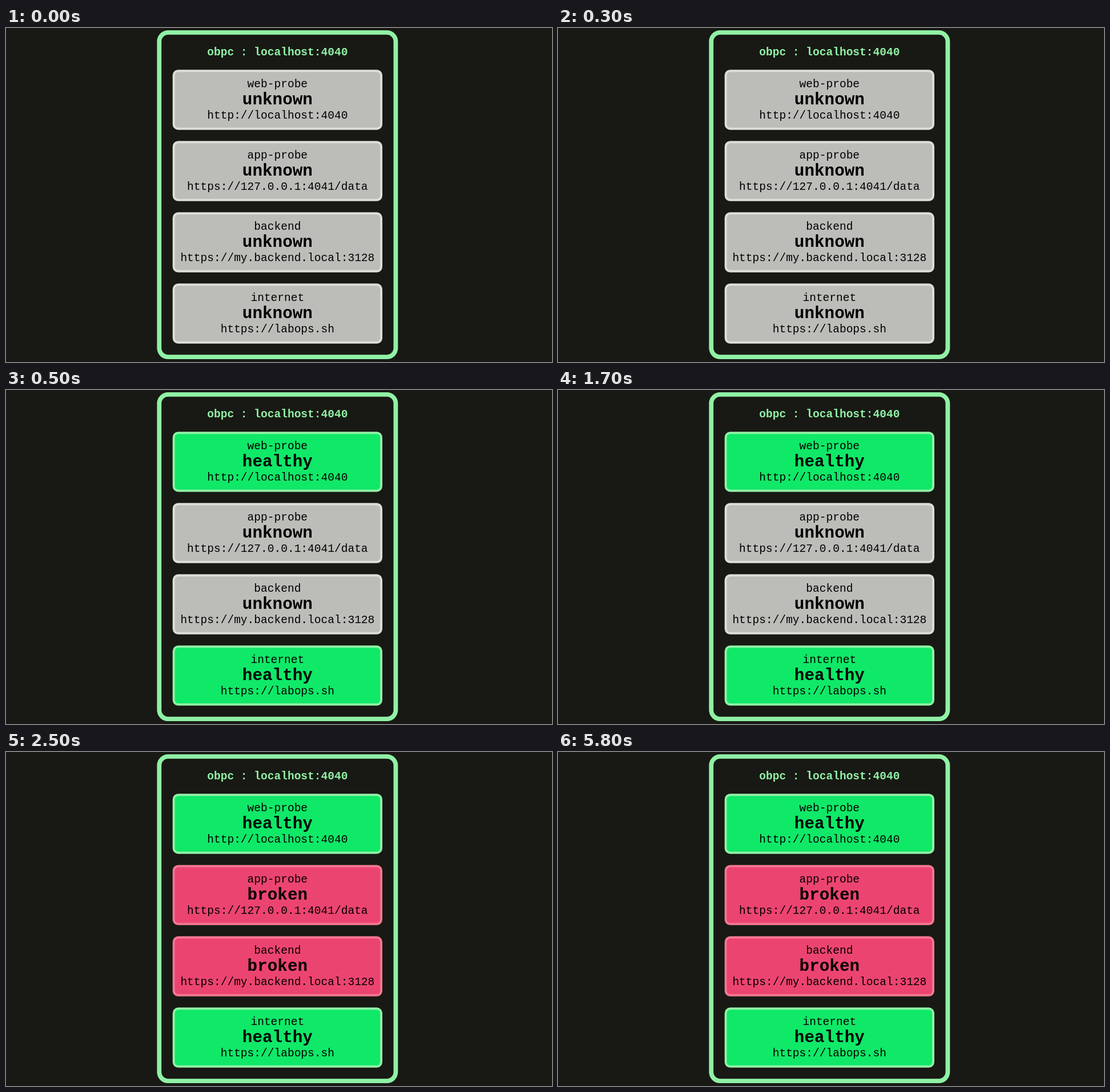
An HTML page with a canvas for the animation above (8000 ms loop, 956x586 px).

```html
<!DOCTYPE html>
<html lang="en">
<head>
<meta charset="utf-8">
<title>Probe status</title>
<style>
  html, body { margin: 0; width: 100%; height: 100%; overflow: hidden; background: #181914; }
  canvas { display: block; }
</style>
</head>
<body>
<canvas id="stage" width="956" height="586"></canvas>
<script>
const ctx = document.getElementById('stage').getContext('2d');
const LOOP = 8000;
const SCALE = 586 / 600;
const BG = '#181914';
const GREEN = '#90f1a5';
const PANEL = { x: 270.7, y: 4, w: 432, h: 591 };
const MID = PANEL.x + PANEL.w / 2;

const STATES = {
  unknown: { fill: '#bcbdb8', edge: '#deded9' },
  healthy: { fill: '#10e868', edge: GREEN },
  broken: { fill: '#ec4470', edge: '#f27891' }
};

const PROBES = [
  { name: 'web-probe', url: 'http://localhost:4040', at: 500, result: 'healthy' },
  { name: 'app-probe', url: 'https://127.0.0.1:4041/data', at: 2500, result: 'broken' },
  { name: 'backend', url: 'https://my.backend.local:3128', at: 2500, result: 'broken' },
  { name: 'internet', url: 'https://labops.sh', at: 500, result: 'healthy' }
];

function fillRound(x, y, w, h, r, color) {
  ctx.fillStyle = color;
  ctx.beginPath();
  ctx.roundRect(x, y, w, h, r);
  ctx.fill();
}

function box(x, y, w, h, r, border, edge, fill) {
  fillRound(x, y, w, h, r, edge);
  fillRound(x + border, y + border, w - 2 * border, h - 2 * border, r - border, fill);
}

function text(str, baseline, size, color, weight = 'normal') {
  ctx.font = `${weight} ${size}px "Liberation Mono", monospace`;
  ctx.fillStyle = color;
  ctx.fillText(str, MID, baseline);
}

function drawProbe(probe, i, t) {
  const state = t >= probe.at ? probe.result : 'unknown';
  const { fill, edge } = STATES[state];
  const y = PANEL.y + 71 + i * 128;
  box(PANEL.x + 28, y, PANEL.w - 56, 108, 10, 4, edge, fill);
  text(probe.name, y + 31, 20, '#000');
  text(state, y + 62, 30, '#000', 'bold');
  text(probe.url, y + 88, 20, '#000');
}

function draw(t) {
  ctx.setTransform(1, 0, 0, 1, 0, 0);
  ctx.fillStyle = BG;
  ctx.fillRect(0, 0, 956, 586);
  ctx.scale(SCALE, SCALE);
  ctx.textAlign = 'center';
  box(PANEL.x, PANEL.y, PANEL.w, PANEL.h, 20, 8, GREEN, BG);
  text('obpc : localhost:4040', PANEL.y + 45, 20, GREEN, 'bold');
  PROBES.forEach((probe, i) => drawProbe(probe, i, t));
}

const start = performance.now();
function tick() {
  draw((performance.now() - start) % LOOP);
  requestAnimationFrame(tick);
}
tick();
</script>
</body>
</html>
```
